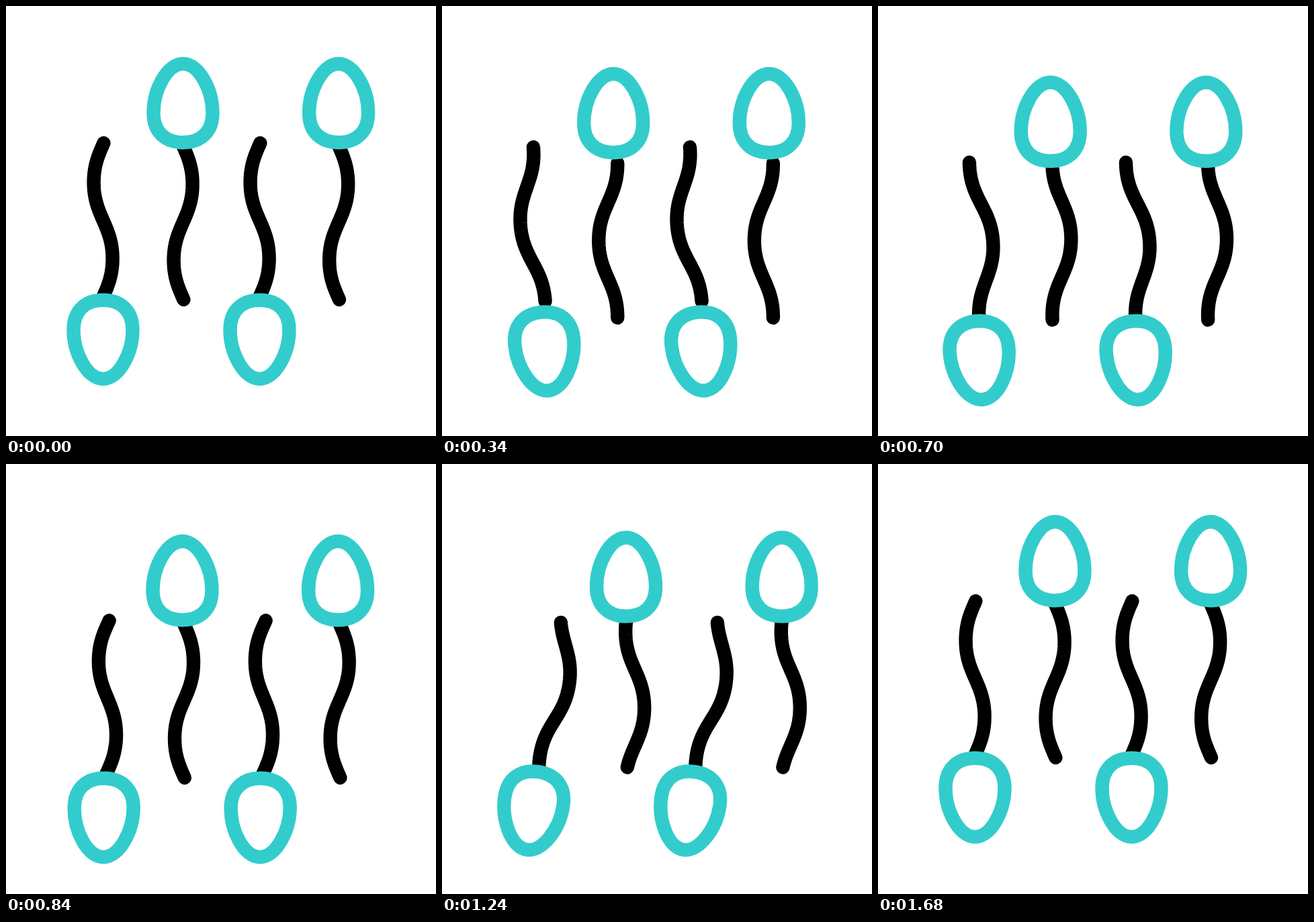
These frames come from a looping animation (640x640 px, 1700 ms). An HTML page:

```html
<!DOCTYPE html>
<html lang="en">
<head>
<meta charset="utf-8">
<title>Swimming cells</title>
<style>
  html, body { margin: 0; width: 100%; height: 100%; overflow: hidden; background: #fff; }
  svg { display: block; width: 100%; height: 100%; }
  path { fill: none; stroke-width: 20.4; stroke-linecap: round; stroke-linejoin: round; }
  #tail { stroke: #000; }
  #head { stroke: #33cccc; }
</style>
</head>
<body>
<svg viewBox="0 0 640 640">
  <defs>
    <g id="cell">
      <path id="tail"/>
      <g id="headBox">
        <path id="head" d="M0 86C24 86 44 125 44 159C44 188 26 203.2 0 203.2C-26 203.2 -44 188 -44 159C-44 125 -24 86 0 86Z"/>
      </g>
    </g>
  </defs>
  <g id="up">
    <use href="#cell"/>
    <use href="#cell" x="231.6"/>
  </g>
  <g id="downA"><use href="#cell"/></g>
  <g id="downB"><use href="#cell"/></g>
</svg>
<script>
  const LOOP = 1700, SPAN = 1680, STEP = 20;
  const WAVE = 227, K = 2 * Math.PI / WAVE, LENGTH = 230;
  const times = [0, 60, 340, 540, 840, 1060, 1440, 1620, SPAN];
  const tracks = {
    drop:    [0, 1.5, 15, 24, 29, 29.5, 12.5, 1.5, 0],
    sway:    [0, -0.8, -8.3, -10.5, -1, 10, 6, 0.8, 0],
    lag:     [0, 0.5, 5.4, 3.5, 2, 0.3, 0.8, 0, 0],
    shift:   [0, 0, 0, -9, 1, 0, 3, 0, 0],
    end:     [437, 438, 449, 441, 438, 428, 432.5, 436.5, 437],
    tilt:    [0, 0.4, 4.4, 6.7, -0.95, -8.3, -4.4, -0.5, 0],
    driftX:  [0, 0.4, 3.9, 1.8, 4.8, 6, 1.5, 0.2, 0],
    driftY:  [0, 0.2, 2.5, 4.5, 1, -3, -2, -0.2, 0]
  };
  const $ = id => document.getElementById(id);

  // Cubic spline through a track; it rests at both ends.
  function sample(v, t) {
    const slope = i => {
      if (i === 0 || i === v.length - 1) return 0;
      const a = times[i] - times[i - 1], b = times[i + 1] - times[i];
      return ((v[i] - v[i - 1]) / a * b + (v[i + 1] - v[i]) / b * a) / (a + b);
    };
    let i = 0;
    while (i < v.length - 2 && t > times[i + 1]) i++;
    const h = times[i + 1] - times[i], u = (t - times[i]) / h, w = 1 - u;
    return w * w * (1 + 2 * u) * v[i] + u * u * (1 + 2 * w) * v[i + 1]
      + h * u * w * (w * slope(i) - u * slope(i + 1));
  }

  const bend = a => 14.45 * Math.cos(a) - 0.45 * Math.cos(3 * a);

  function tailPath(p, t) {
    const crest = 265 - WAVE * (1 - Math.cos(Math.PI * t / SPAN)) + p.shift;
    const axis = p.sway + p.lag - bend(K * (208 - crest));
    const start = Math.max(p.end - LENGTH, 204);
    const points = [];
    for (let i = 0; i <= 60; i++) {
      const y = start + (p.end - start) * i / 60;
      points.push((axis + bend(K * (y - crest))).toFixed(2) + " " + y.toFixed(2));
    }
    return "M" + points.join("L");
  }

  function draw(ms) {
    const t = Math.min(SPAN, Math.floor(ms % LOOP / STEP) * STEP);
    const p = {};
    for (const name in tracks) p[name] = sample(tracks[name], t);
    $("tail").setAttribute("d", tailPath(p, t));
    $("headBox").setAttribute("transform", `translate(${p.sway} 0)`);
    $("up").setAttribute("transform", `translate(263.5 ${p.drop})`);
    const flip = x => `translate(${x + p.driftX} ${p.drop + p.driftY}) `
      + `rotate(${-p.tilt} 0 325) translate(0 641) scale(1 -1)`;
    $("downA").setAttribute("transform", flip(144.5));
    $("downB").setAttribute("transform", flip(377.5));
  }

  let origin = null;
  function tick(now) {
    if (origin === null) origin = now;
    draw(now - origin);
    requestAnimationFrame(tick);
  }
  draw(0);
  requestAnimationFrame(tick);
</script>
</body>
</html>
```
